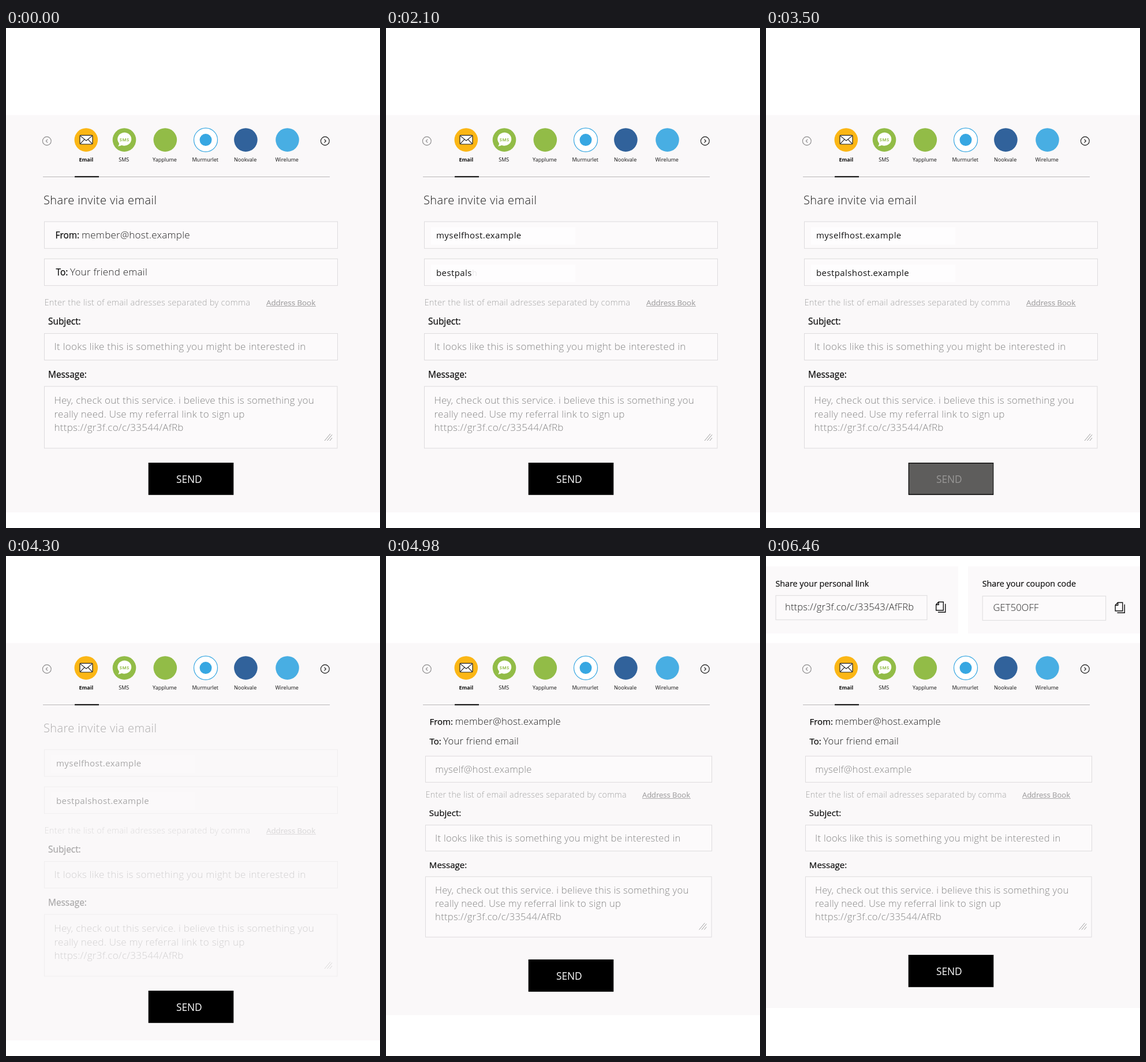
Animation, 648 px wide and 865 px high, one loop 6780 ms. Source, as an HTML page:

```html
<!DOCTYPE html>
<html lang="en">
<head>
<meta charset="utf-8">
<title>Share invite</title>
<style>
html, body { margin: 0; width: 100%; height: 100%; overflow: hidden; background: #fff; }
svg { display: block; width: 648px; height: 865px; font-family: "Open Sans", "Noto Sans", sans-serif; }
.box { fill: #fcfafb; stroke: #dddbdd; }
.title { font-size: 20px; font-weight: 300; letter-spacing: .4px; fill: #1c1c1c; }
.text { font-size: 17px; font-weight: 300; letter-spacing: .26px; fill: #222; }
.hint { font-size: 17px; font-weight: 300; letter-spacing: .26px; fill: #858585; }
.note { font-size: 14.7px; font-weight: 300; letter-spacing: .25px; fill: #a5a5a5; }
.label { font-size: 15.4px; font-weight: 500; fill: #0c0c0c; stroke: #0c0c0c; stroke-width: .25px; }
.link { font-size: 13.3px; font-weight: 500; fill: #a3a2a3; stroke: #a3a2a3; stroke-width: .2px; }
.typed { font-size: 15px; letter-spacing: .4px; fill: #111; }
.tab { font-size: 9px; font-weight: 500; text-anchor: middle; fill: #111; }
.head { font-size: 14.3px; font-weight: 500; fill: #0c0c0c; stroke: #0c0c0c; stroke-width: .2px; }
.code { font-size: 16.5px; font-weight: 300; letter-spacing: .15px; fill: #222; }
.line { fill: none; stroke: #111; stroke-width: 1.4; }
</style>
</head>
<body>
<svg id="stage" viewBox="0 0 648 865"></svg>
<script>
const LOOP = 6780;
const PANEL = '#faf8f9', CARD = '#fbf9fa';
const stage = document.getElementById('stage');

const text = (cls, x, y, s, extra = '') => `<text class="${cls}" x="${x}" y="${y}" ${extra}>${s}</text>`;
const rect = (x, y, w, h, attrs) => `<rect x="${x}" y="${y}" width="${w}" height="${h}" ${attrs}/>`;
const box = (x, y, w, h) => rect(x, y, w, h, 'class="box"');
const disc = (x, y, r, fill, extra = '') => `<circle cx="${x}" cy="${y}" r="${r}" fill="${fill}" ${extra}/>`;
const path = (d, extra = 'class="line"') => `<path d="${d}" ${extra}/>`;

// Share targets
const tabs = [
  [138.8, 'Email', '#fbb615'],
  [205, 'SMS', '#92bc47'],
  [275.8, 'Yapplume', '#92bc47'],
  [346, 'Murmurlet', '#37a7e2'],
  [415.4, 'Nookvale', '#31629b'],
  [487.5, 'Wirelume', '#48aee3']
].map(([x, name, color], i) =>
  (i === 3
    ? disc(x, 193.6, 20.5, '#fff', `stroke="${color}" stroke-width="1.2"`) + disc(x, 193.6, 10.5, color)
    : disc(x, 193.6, 20.3, color)) +
  text('tab', i ? x - .8 : x, 230.8, name, i ? '' : 'style="font-weight:700"')
).join('');

const icons =
  rect(128, 185.6, 22, 15.4, 'rx="1.5" fill="#fff" stroke="#222" stroke-width="1.2"') +
  path('M128.5 186.3L139 195L149.5 186.3M128.5 200.5L136 192.6M149.5 200.5L142 192.6',
    'fill="none" stroke="#222" stroke-width="1.1"') +
  path('M194 204.5Q196.5 202.5 196 199.5A12 11.4 0 1 1 200.5 202.7Q197.5 204.6 194 204.5Z', 'fill="#fff"') +
  text('tab', 205.3, 195.6, 'SMS', 'style="font-size:7.6px;font-weight:700;letter-spacing:.5px;fill:#92bc47"');

const arrow = (x, dir, color) =>
  disc(x, 195.5, 7.4, 'none', `stroke="${color}" stroke-width="1.1"`) +
  path(`M${x - dir * 1.3} 192.6L${x + dir * 1.5} 195.5L${x - dir * 1.3} 198.4`,
    `fill="none" stroke="${color}" stroke-width="1.1"`);

const header = tabs + icons + arrow(70.8, -1, '#8a898a') + arrow(552.8, 1, '#111') +
  rect(64, 257, 497, 1, 'fill="#b9b7b9"') + rect(119, 256.3, 42, 2, 'fill="#000"');

// Lower part, shared by both forms
const details =
  text('note', 66.5, 480, 'Enter the list of email adresses separated by comma') +
  text('link', 451, 480, 'Address Book') + rect(451, 481, 86, 1, 'fill="#a9a8a9"') +
  text('label', 73, 513, 'Subject:') + box(66.5, 528.5, 508, 46) +
  text('hint', 83.5, 557.3, 'It looks like this is something you might be interested in') +
  text('label', 73, 605.3, 'Message:') + box(66.5, 620, 507.5, 107) +
  ['Hey, check out this service. i believe this is something you',
   'really need. Use my referral link to sign up',
   'https://gr3f.co/c/33544/AfRb'
  ].map((s, i) => text('hint', 83.5, 650.3 + i * 23.3, s)).join('') +
  path('M552 714L562 702M556.5 714L565 703.5M561 714L565 709', 'stroke="#999" stroke-width="1"');

const typed = (id, y, s) =>
  `<g id="${id}">` + rect(78, y - 19.5, 250, 30, 'fill="#fefdfe"') + '</g>' +
  `<text class="typed" x="87" y="${y}">` +
  [...s].map(c => `<tspan class="${id}-char" fill-opacity="0">${c}</tspan>`).join('') + '</text>';

const editForm = '<g id="edit">' +
  text('title', 65, 305, 'Share invite via email') +
  box(66.5, 335, 508, 46.3) + text('label', 85.5, 364, 'From:') + text('text', 131, 364, 'member@host.example') +
  box(66.5, 399.3, 508, 46.3) + text('label', 86.5, 428, 'To:') + text('text', 111, 428, 'Your friend email') +
  typed('from', 364.3, 'myselfhost.example') + typed('to', 428.7, 'bestpalshost.example') +
  details + '</g>';

const K = .9764;
const small = `style="font-size:${17 * K}px"`;
const sentForm = '<g id="sent">' +
  text('label', 75.5, 291.7, 'From:', 'style="font-size:15px"') + text('text', 119.7, 291.7, 'member@host.example', small) +
  text('label', 75.5, 325.5, 'To:', 'style="font-size:15px"') + text('text', 99.3, 325.5, 'Your friend email', small) +
  box(68.5, 346.2, 496, 45.2) + text('hint', 85.3, 375.4, 'myself@host.example', small) +
  `<g transform="translate(3.6 -50.6) scale(${K})">${details}</g></g>`;

const button = '<g id="button">' + rect(246.7, 752, 147.6, 55.8, 'fill="#000"') +
  text('send', 317.3, 787, 'SEND', 'text-anchor="middle" font-size="17.3" fill="#fff"') +
  rect(248, 753.3, 145.3, 53, 'id="press" fill="#7b7a78"') + '</g>';

const copyIcon = (x, y) => `<g transform="translate(${x} ${y})">` +
  path('M5 .7H13.3V15.2H.7V5.2ZM5.2 .7V5.4H.7M16.8 4V18.4H4') + '</g>';

const card = (id, x, w, title, titleX, fieldY, fieldW, code, codeX, iconX) => `<g id="${id}">` +
  rect(x, 18, w, 116, `fill="${CARD}"`) + text('head', titleX, 53, title) +
  box(titleX + .5, fieldY + .3, fieldW, 42) + text('code', codeX, fieldY + 26.3, code) +
  copyIcon(iconX, fieldY + 10.8) + '</g>';

stage.innerHTML = rect(0, 150.6, 648, 687.4, `id="panel" fill="${PANEL}"`) + header + editForm + sentForm + button +
  card('linkCard', 0, 333, 'Share your personal link', 16.5, 68, 262, 'https://gr3f.co/c/33543/AfFRb', 33, 294) +
  card('couponCard', 350, 298, 'Share your coupon code', 374.7, 69, 213.5, 'GET50OFF', 393.5, 604.5);

const el = {};
for (const node of stage.querySelectorAll('[id]')) el[node.id] = node;
const chars = id => [...stage.querySelectorAll(`.${id}-char`)];
const fromChars = chars('from'), toChars = chars('to');

// Progress of t between a and b, eased
const ease = { linear: p => p, out: p => p * (2 - p), inOut: p => p * p * (3 - 2 * p) };
const span = (t, a, b, fn = ease.linear) => fn(Math.min(1, Math.max(0, (t - a) / (b - a))));
const fade = (node, v) => node.setAttribute('opacity', v.toFixed(3));
const type = (list, p) => list.forEach((c, i) =>
  c.setAttribute('fill-opacity', Math.min(1, Math.max(0, p * list.length - i)).toFixed(3)));

function render(t) {
  fade(el.from, span(t, 160, 660));
  type(fromChars, span(t, 690, 1395));
  fade(el.to, span(t, 1390, 1770));
  type(toChars, span(t, 1790, 2560));

  fade(el.press, .83 * (span(t, 3180, 3244) - span(t, 3480, 3760)));

  fade(el.edit, 1 - span(t, 4070, 4420));
  fade(el.sent, span(t, 4565, 4800));
  el.panel.setAttribute('height', 687.4 - 56 * span(t, 4570, 5160, ease.inOut));
  el.button.setAttribute('transform', `translate(0 ${-62 * span(t, 4570, 5100, ease.inOut)})`);

  fade(el.linkCard, span(t, 5340, 5620, ease.out));
  fade(el.couponCard, span(t, 5990, 6320, ease.out));
}

const start = performance.now();
function tick() {
  render((performance.now() - start) % LOOP);
  requestAnimationFrame(tick);
}
tick();
</script>
</body>
</html>
```
